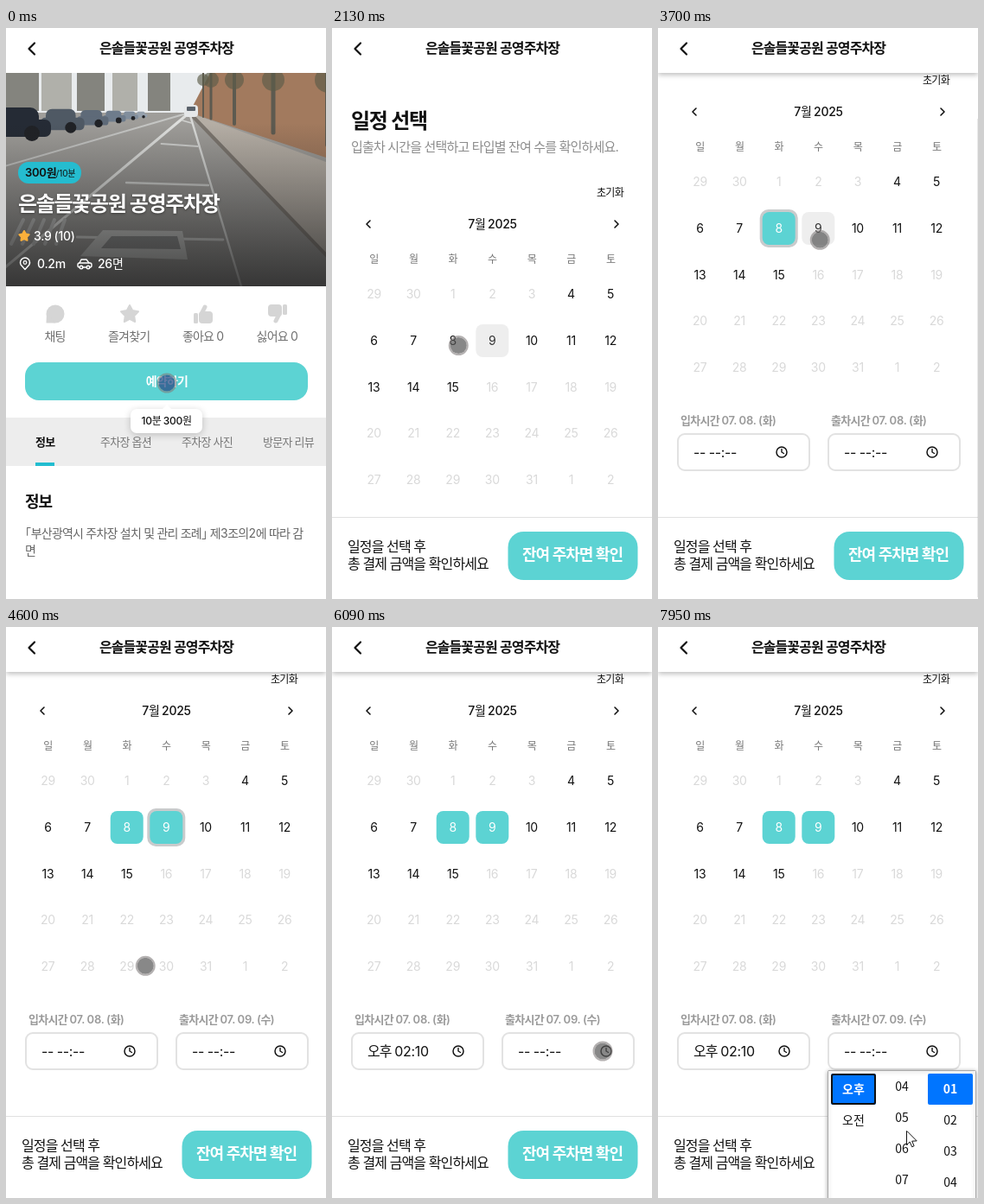
Animation of 370x661 px, one loop 8 s. Source, as an HTML page with a canvas:

```html
<!DOCTYPE html>
<html lang="ko">
<head>
<meta charset="utf-8">
<title>주차 예약</title>
<style>
html, body { margin: 0; width: 100%; height: 100%; overflow: hidden; background: #fff; }
canvas { display: block; width: 370px; height: 661px; }
</style>
</head>
<body>
<canvas id="stage"></canvas>
<script>
const W = 370, H = 661, LOOP = 8000;
const canvas = document.getElementById('stage');
const ctx = canvas.getContext('2d');
const dpr = window.devicePixelRatio || 1;
canvas.width = W * dpr;
canvas.height = H * dpr;

const SANS = 'Inter, "Noto Sans CJK KR", sans-serif';
const PICKER = '"Noto Sans CJK KR", "Noto Sans", sans-serif';
const TEAL = '#5cd3d3', BLUE = '#0075ff', PALE = '#d9d9d9', ICON = '#d5d5d5';
const PLACE = '은솔들꽃공원 공영주차장';

const PAGE_FADE = [430, 1060];
const PICK_ENTRY = 3000, PICK_EXIT = 4180;
const ENTRY_OPEN = 5120, MINUTE_PICK = 5440, ENTRY_CLOSE = 5950, EXIT_OPEN = 6220;

const clamp = v => Math.max(0, Math.min(1, v));
const mix = (a, b, k) => a + (b - a) * k;
const ease = v => v * v * (3 - 2 * v);
const easeOut = v => 1 - (1 - v) ** 2;
const span = (t, from, to) => clamp((t - from) / (to - from));

// Hangul is set a little tighter than digits and punctuation.
function text(str, x, y, size, { weight = 400, color = '#111', align = 'left', family = SANS } = {}) {
  ctx.font = `${weight} ${size}px ${family}`;
  ctx.fillStyle = color;
  const runs = str.match(/[가-힣 ]+|[^가-힣 ]+/g).map(part => {
    const spacing = family === PICKER ? '0px' : size * (/[가-힣 ]/.test(part) ? -0.056 : -0.02) + 'px';
    ctx.letterSpacing = spacing;
    return { part, spacing, width: ctx.measureText(part).width };
  });
  if (align === 'center') x -= runs.reduce((sum, run) => sum + run.width, 0) / 2;
  for (const run of runs) {
    ctx.letterSpacing = run.spacing;
    ctx.fillText(run.part, x, y + size * 0.36);
    x += run.width;
  }
  return x;
}

function paint(fill, stroke, width = 1) {
  if (fill) { ctx.fillStyle = fill; ctx.fill(); }
  if (stroke) { ctx.strokeStyle = stroke; ctx.lineWidth = width; ctx.stroke(); }
}

function box(x, y, w, h, r, ...style) {
  ctx.beginPath();
  ctx.roundRect(x, y, w, h, r);
  paint(...style);
}

function disc(x, y, r, ...style) {
  ctx.beginPath();
  ctx.arc(x, y, r, 0, 7);
  paint(...style);
}

function trace(pts) {
  ctx.beginPath();
  for (let i = 0; i < pts.length; i += 2) ctx.lineTo(pts[i], pts[i + 1]);
}

function poly(color, ...pts) {
  trace(pts);
  ctx.closePath();
  paint(color);
}

function line(color, width, ...pts) {
  trace(pts);
  ctx.lineCap = ctx.lineJoin = 'round';
  paint(null, color, width);
}

function chevron(x, y, w, h, width) {
  line('#111', width, x + w, y - h, x, y, x + w, y + h);
}

function withShadow(color, blur, dy, draw) {
  ctx.save();
  ctx.shadowColor = color;
  ctx.shadowBlur = blur * dpr;
  ctx.shadowOffsetY = dy * dpr;
  draw();
  ctx.restore();
}

function star(x, y, r, color) {
  ctx.beginPath();
  for (let i = 0; i < 10; i++) {
    const a = i * Math.PI / 5 - Math.PI / 2, d = i % 2 ? r * 0.52 : r;
    ctx.lineTo(x + d * Math.cos(a), y + d * Math.sin(a));
  }
  ctx.closePath();
  ctx.lineJoin = 'round';
  paint(color, color, 2);
}

function thumb(x, y, turn) {
  ctx.save();
  ctx.translate(x, y);
  ctx.rotate(turn);
  box(-11, -1, 5, 12, 1.5, ICON);
  box(-5, -3, 16, 14, 4, ICON);
  line(ICON, 5, -2, 0, 2, -8);
  ctx.restore();
}

function photo() {
  const top = 52, bottom = 299, vx = 212, vy = 98;
  const ray = (color, width, x) => line(color, width, vx, vy, x, bottom);
  const wedge = (color, x0, x1) => poly(color, vx, vy, x0, bottom, x1, bottom);
  const fade = (y0, c0, c1) => {
    const g = ctx.createLinearGradient(0, y0, 0, bottom);
    g.addColorStop(0, c0);
    g.addColorStop(1, c1);
    ctx.fillStyle = g;
    ctx.fillRect(0, top, W, bottom - top);
  };
  ctx.save();
  ctx.beginPath();
  ctx.rect(0, top, W, bottom - top);
  ctx.clip();
  fade(top, '#a3a19d', '#8f8e8c');

  ctx.fillStyle = '#e8ebed';
  ctx.fillRect(0, top, W, vy - top);
  for (let i = 0; i < 5; i++) {
    const shade = 132 + i % 2 * 44;
    box(i * 41, top, 38 - i * 3, 44, 0, `rgb(${shade},${shade},${shade - 6})`);
  }
  poly('#a27a5e', 236, top, W, top, W, 150, vx, vy);
  wedge('#b5aea5', 405, 770);
  ray('#7b756e', 4, 405);
  for (let i = 0; i < 5; i++) {
    const x = 228 + i * i * 9;
    line('#5d5a50', 2 + i, x, top, x, 103 + i * i * 2);
    disc(x, 60, 7 + i * 2, 'rgba(92,92,72,.65)');
  }

  ray('#dedfdd', 3, -27);
  ray('#d8d9d7', 2.5, 272);
  ray('#c5c6c4', 2, -480);
  for (let i = 1; i < 5; i++) {
    const y = vy + i * i * 9, half = (y - vy) * 0.9;
    line('#cfd0ce', 1 + i / 2, vx - half, y, vx + half * 0.3, y + 3);
  }
  poly('#c4c5c3', 112, 234, 204, 235, 210, 268, 86, 264);
  poly('#858686', 122, 241, 198, 241, 202, 256, 110, 255);
  for (let i = 0; i < 5; i++) line('#b9bab9', 4, 20 + i * 12, 222, 6 + i * 13, 250);

  for (let i = 5; i >= 0; i--) {
    const s = 0.72 ** i, x = 190 - 200 * s, y = vy + 28 * s;
    const body = i ? `hsl(212,12%,${28 + i * 7}%)` : '#252b35';
    box(x, y - 34 * s, 48 * s, 30 * s, 10 * s, body);
    box(x - 8 * s, y - 34 * s + 14 * s, 70 * s, 20 * s, 7 * s, body);
    disc(x + 40 * s, y - 4 * s, 9 * s, '#202226');
  }
  box(206, 89, 16, 14, 4, '#e5e7e8');
  box(209, 91, 10, 5, 1, '#59616a');

  fade(110, 'rgba(30,30,30,0)', 'rgba(30,30,30,.78)');
  ctx.restore();
}

function pinIcon(x, y) {
  ctx.beginPath();
  ctx.arc(x, y, 5.5, Math.PI * 0.85, Math.PI * 2.15);
  ctx.lineTo(x, y + 8);
  ctx.closePath();
  paint(null, '#fff', 1.4);
  disc(x, y, 1.8, null, '#fff', 1.2);
}

function carIcon(x, y) {
  box(x - 8, y - 1, 16, 5, 2, null, '#fff', 1.4);
  line('#fff', 1.4, x - 6, y - 1, x - 4, y - 5, x + 2, y - 5, x + 5, y - 1);
  for (const dx of [-4, 4]) disc(x + dx, y + 4, 1.8, '#555', '#fff', 1.4);
}

function detailPage() {
  ctx.fillStyle = '#fff';
  ctx.fillRect(0, 52, W, H);
  photo();
  box(14, 155, 73, 25, 12, '#25bccf');
  const after = text('300원', 22, 167, 13, { weight: 600 });
  text('/10분', after, 168, 10);
  const white = { color: '#fff', weight: 500 };
  withShadow('rgba(0,0,0,.4)', 3, 1, () =>
    text(PLACE, 14, 203, 24, { color: '#fff', weight: 700 }));
  star(21, 241, 6, '#fbb03b');
  text('3.9 (10)', 32, 241, 14, white);
  pinIcon(22, 271.5);
  text('0.2m', 36, 273, 14, white);
  carIcon(91, 273);
  text('26면', 106, 273, 14, white);

  disc(57, 331, 10.5, ICON);
  poly(ICON, 47, 330, 46.5, 341.5, 57, 341.5);
  star(143, 331.5, 10.5, ICON);
  thumb(228, 331, 0);
  thumb(314, 331, Math.PI);
  ['채팅', '즐겨찾기', '좋아요 0', '싫어요 0'].forEach((label, i) =>
    text(label, 56.5 + i * 85.7, 357, 14, { color: '#6f6f6f', align: 'center' }));

  box(22, 387, 327, 44, 16, TEAL);
  text('예약하기', 186, 409, 14, { color: '#fff', weight: 600, align: 'center' });

  ctx.fillStyle = '#ededed';
  ctx.fillRect(0, 451, W, 56);
  text('정보', 34, 479, 13, { weight: 600 });
  ['주차장 옵션', '주차장 사진', '방문자 리뷰'].forEach((label, i) =>
    text(label, 109 + i * 94, 479, 13, { color: '#777' }));
  ctx.fillStyle = '#22bdd0';
  ctx.fillRect(34, 503, 22, 4);

  withShadow('rgba(0,0,0,.2)', 8, 2, () => box(144, 441, 83, 28, 7, '#fff'));
  poly('#fff', 180, 442, 186, 436, 192, 442);
  text('10분 300원', 185.5, 455, 12, { weight: 500, align: 'center' });

  text('정보', 22, 549, 18, { weight: 600 });
  text('｢부산광역시 주차장 설치 및 관리 조례｣ 제3조의2에 따라 감', 22, 585, 14, { color: '#666' });
  text('면', 22, 605, 14, { color: '#666' });
  text('운영시간', 22, 671, 18, { weight: 600 });
}

function dayCell(day, x, y, t) {
  const open = day >= 4 && day <= 15;
  const picked = (day === 8 && t >= PICK_ENTRY) || (day === 9 && t >= PICK_EXIT);
  const focused = picked && (day === 8 ? t < PICK_EXIT : t < ENTRY_OPEN);
  if (focused) box(x - 22, y - 22, 44, 44, 10, '#c9cbcc');
  if (picked || day === 9) box(x - 19, y - 19, 38, 38, 8, picked ? TEAL : '#eee');
  const color = picked ? '#fff' : day === 9 ? '#333' : open ? '#111' : PALE;
  text(String(day), x, y, 14, { color, align: 'center' });
}

function timeField(x, label, value) {
  text(label, x + 4, 584, 13, { weight: 600, color: '#9a9a9a' });
  box(x + 1, 600, 152, 42, 8, '#fff', '#e2e2e2', 2);
  text(value || '-- --:--', x + 19, 621, 16);
  const cx = x + (value ? 124 : 121);
  disc(cx, 621, 6, null, '#111', 1.5);
  line('#111', 1.4, cx, 617.5, cx, 621, cx + 2.5, 622.5);
}

function schedulePage(t, scroll) {
  ctx.fillStyle = '#fff';
  ctx.fillRect(0, 52, W, H);
  ctx.save();
  ctx.translate(0, -scroll);
  text('일정 선택', 22, 107, 24, { weight: 600 });
  text('입출차 시간을 선택하고 타입별 잔여 수를 확인하세요.', 22, 138, 15, { color: '#8c8c8c' });
  text('초기화', 306, 191, 12);
  text('7월 2025', 185.5, 227, 14, { weight: 500, align: 'center' });
  chevron(40, 227, 4, 4, 1.6);
  chevron(331, 227, -4, 4, 1.6);
  const column = i => 48.5 + (i % 7) * 45.6;
  [...'일월화수목금토'].forEach((name, i) =>
    text(name, column(i), 268, 12, { color: '#777', align: 'center' }));
  for (let i = 0; i < 35; i++) {
    const date = new Date(2025, 5, 29 + i);
    const x = column(i), y = Math.round(308.3 + Math.floor(i / 7) * 53.7);
    if (date.getMonth() === 6) dayCell(date.getDate(), x, y, t);
    else text(String(date.getDate()), x, y, 14, { color: PALE, align: 'center' });
  }
  if (t >= PICK_ENTRY) {
    timeField(22, '입차시간 07. 08. (화)', t >= ENTRY_CLOSE && '오후 02:10');
    timeField(196, '출차시간 ' + (t < PICK_EXIT ? '07. 08. (화)' : '07. 09. (수)'));
  }
  ctx.restore();

  ctx.fillStyle = '#fff';
  ctx.fillRect(0, 567, W, 94);
  ctx.fillStyle = '#e0e0e0';
  ctx.fillRect(0, 566, W, 1);
  text('일정을 선택 후', 18, 600, 16);
  text('총 결제 금액을 확인하세요', 18, 620, 16);
  box(203.5, 583, 150, 56, 18, TEAL);
  text('잔여 주차면 확인', 278, 610, 18, { color: '#fff', weight: 600, align: 'center' });
}

function header(shadow) {
  withShadow(`rgba(0,0,0,${0.28 * shadow})`, 6, 2, () => {
    ctx.fillStyle = '#fff';
    ctx.fillRect(0, 0, W, 52);
  });
  chevron(26.5, 24, 6.5, 6.5, 2.2);
  text(PLACE, 185.5, 23, 16, { weight: 600, align: 'center' });
}

const numbers = (from, to) =>
  Array.from({ length: to - from + 1 }, (_, i) => String(from + i).padStart(2, '0'));
const HALVES = ['오후', '오전'], HOURS = numbers(2, 12), MINUTES = numbers(1, 59);

// Each column has its items, the chosen one, a scroll offset and whether the choice has focus.
function picker(x, columns) {
  withShadow('rgba(0,0,0,.3)', 5, 1, () => box(x + 0.5, 513.5, 171, 170, 1, '#fff', '#aaa'));
  columns.forEach(({ items, chosen, offset = 0, focus }, c) => {
    const left = x + 4 + c * 56;
    ctx.save();
    ctx.beginPath();
    ctx.rect(left, 517, 52, 150);
    ctx.clip();
    items.forEach((item, i) => {
      const top = 517 + i * 36 - offset, on = item === chosen;
      if (on) box(left, top, 52, 36, 2, BLUE);
      if (on && focus) box(left + 1, top + 1, 50, 34, 2, null, '#101010', 2);
      text(item, left + 26, top + 18, 14, {
        family: PICKER, align: 'center', weight: on ? 700 : 400, color: on ? '#fff' : '#111' });
    });
    ctx.restore();
  });
}

function pickers(t) {
  if (t >= ENTRY_OPEN && t < ENTRY_CLOSE) {
    const done = t >= MINUTE_PICK;
    picker(22, [
      { items: HALVES, chosen: '오후', focus: !done },
      { items: HOURS, chosen: '02' },
      { items: MINUTES, chosen: done ? '10' : '01', focus: done,
        offset: 217 * ease(span(t, ENTRY_OPEN + 60, MINUTE_PICK - 20)) }
    ]);
  } else if (t >= EXIT_OPEN) {
    picker(196, [
      { items: HALVES, chosen: '오후', focus: true },
      { items: HOURS, chosen: '02', offset: 75 * ease(span(t, 7370, 7950)) },
      { items: MINUTES, chosen: '01' }
    ]);
  }
}

// Pointer moves: start time, end time, destination.
const MOVES = [
  [1790, 2200, 143, 364], [3300, 3770, 190, 238], [4250, 4860, 143, 490], [5120, 5400, 172, 647],
  [5560, 6090, 313, 491], [6560, 6840, 230, 584], [6900, 7330, 287, 583]
];

function pointerAt(t) {
  let x = 186, y = 411;
  for (const [from, to, toX, toY] of MOVES) {
    const k = ease(span(t, from, to));
    x = mix(x, toX, k);
    y = mix(y, toY, k);
  }
  return [x, y];
}

function touchDot(x, y, t) {
  const press = t < PICK_ENTRY
    ? span(t, 2330, 2540) * (t < 2740)
    : span(t, 3840, 3980) * (t < PICK_EXIT);
  const r = 9.5 + 3 * press;
  disc(x, y, r, t < 530 ? 'rgba(40,70,130,.72)' : 'rgba(85,85,85,.7)');
  disc(x, y, r + 1, null, 'rgba(130,125,125,.6)', 2);
}

function arrow(x, y) {
  ctx.save();
  ctx.translate(x + 0.5, y + 0.5);
  trace([0, 0, 0, 16, 3.7, 12.6, 6.2, 18.3, 8.6, 17.2, 6.2, 11.7, 11.3, 11.4]);
  ctx.closePath();
  paint('#fff', '#111', 1);
  ctx.restore();
}

function draw(t) {
  ctx.setTransform(dpr, 0, 0, dpr, 0, 0);
  ctx.fillStyle = '#fff';
  ctx.fillRect(0, 0, W, H);

  const scroll = t < PICK_ENTRY ? 0 : mix(19, 130, easeOut(span(t, PICK_ENTRY, 3480)));
  const fade = easeOut(span(t, ...PAGE_FADE));
  if (fade < 1) detailPage();
  if (fade > 0) {
    ctx.globalAlpha = fade;
    schedulePage(t, scroll);
    ctx.globalAlpha = 1;
  }
  header(clamp((scroll - 20) / 60));

  if (t >= PICK_ENTRY) {
    ctx.globalAlpha = 1 - span(t, 3500, 3770);
    ctx.fillStyle = '#a8a8a8';
    ctx.fillRect(369, mix(11, 105, span(scroll, 19, 130)), 1, 554);
    ctx.globalAlpha = 1;
  }

  const [x, y] = pointerAt(t);
  const inEntry = t >= ENTRY_OPEN && t < ENTRY_CLOSE && x < 194;
  const inExit = t >= EXIT_OPEN && x > 196;
  const overPicker = y > 514 && (inEntry || inExit);
  if (!overPicker) touchDot(x, y, t);
  pickers(t);
  if (overPicker) arrow(x, y);
}

const start = performance.now();
function tick() {
  draw((performance.now() - start) % LOOP);
  requestAnimationFrame(tick);
}
tick();
</script>
</body>
</html>
```
